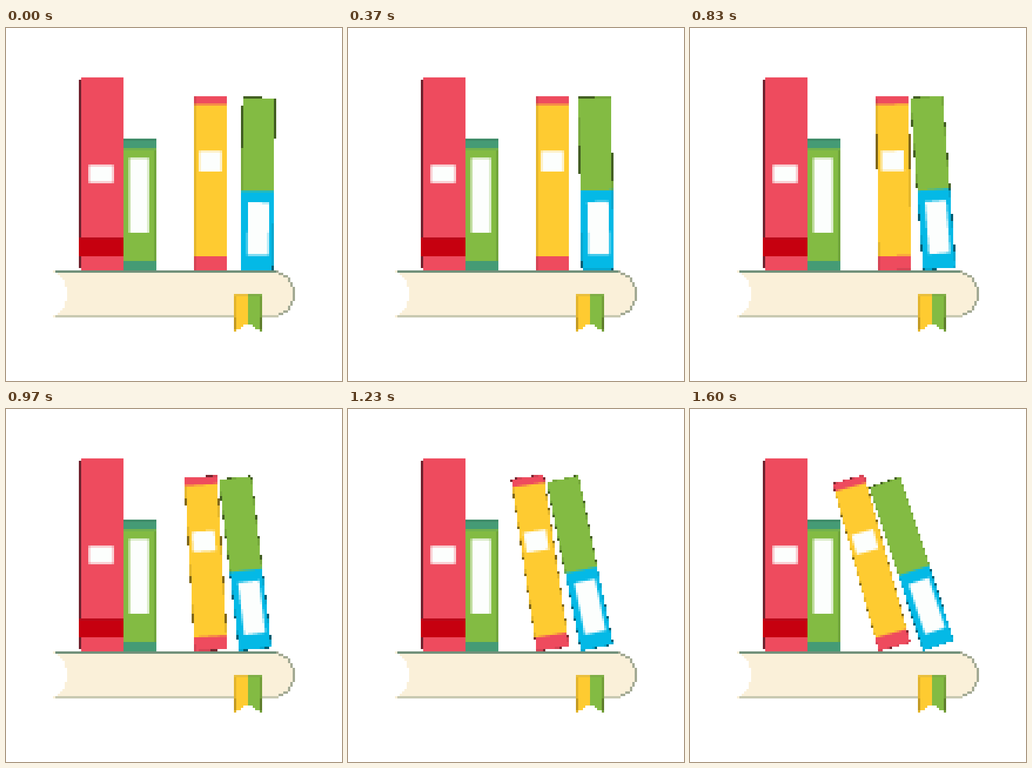
An HTML page with a canvas that plays this animation: 572 px wide and 600 px high, repeating every 2010 ms.

```html
<!DOCTYPE html>
<html lang="en">
<head>
<meta charset="utf-8">
<title>Leaning books</title>
<style>
html, body { margin: 0; width: 100%; height: 100%; overflow: hidden; background: #fff; }
canvas { display: block; width: 572px; height: 600px; image-rendering: pixelated; }
</style>
</head>
<body>
<canvas id="stage" width="143" height="150"></canvas>
<script>
const ctx = document.getElementById('stage').getContext('2d');
const CELL = 4, SUB = 4, LOOP = 2010, LAST = 48, HIT = 23.5;

const RED = [238, 75, 94], GREEN = [131, 187, 67], YELLOW = [254, 203, 49];
const CYAN = [4, 185, 230], PAPER = [252, 254, 253], CREAM = [250, 240, 217];

function cell(x, y, c) {
  ctx.fillStyle = `rgb(${c.map(Math.round)})`;
  ctx.fillRect(x / CELL, y / CELL, 1, 1);
}

function rect(x0, y0, x1, y1, color) {
  ctx.fillStyle = color;
  ctx.fillRect(x0 / CELL, y0 / CELL, (x1 - x0) / CELL, (y1 - y0) / CELL);
}

// Hard outer edge with a darkened rim, blended inner edges.
function plot(x0, y0, x1, y1, colorAt) {
  for (let y = y0; y < y1; y += CELL) {
    for (let x = x0; x < x1; x += CELL) {
      const sum = [0, 0, 0];
      let hits = 0;
      for (let i = 0; i < SUB * SUB; i++) {
        const c = colorAt(x + (i % SUB + .5) * CELL / SUB, y + (Math.floor(i / SUB) + .5) * CELL / SUB);
        if (!c) continue;
        hits++;
        c.forEach((v, n) => sum[n] += v);
      }
      const cover = hits / (SUB * SUB);
      if (cover < .5) continue;
      const shade = cover < .58 ? .5 : cover < .9 ? .9 : 1;
      cell(x, y, sum.map(v => v / hits * shade));
    }
  }
}

const within = (v, a, b) => v >= a && v < b;

// Book turned to the left about its lower left corner.
function book(px, py, w, h, deg, paint) {
  const a = deg * Math.PI / 180, s = Math.sin(a), c = Math.cos(a);
  plot(232, 104, 472, 412, (x, y) => {
    const dx = x - px, dy = py - y;
    const u = dx * c + dy * s, v = dy * c - dx * s;
    return within(u, 0, w) && within(v, 0, h) ? paint(u, v) : null;
  });
}

function yellowPaint(u, v) {
  if (within(u, 7.5, 46) && within(v, 168.5, 203)) return PAPER;
  return v < 24 || v > 282 ? RED : YELLOW;
}

function greenPaint(u, v) {
  if (within(u, 12, 48) && within(v, 26, 115.5)) return PAPER;
  return v < 135 ? CYAN : GREEN;
}

function label(x0, y0, x1, y1, back) {
  plot(Math.floor(x0 / 4) * 4, Math.floor(y0 / 4) * 4, x1, y1, (x, y) =>
    within(x, x0, x1) && within(y, y0, y1) ? PAPER : back);
}

function standing() {
  rect(124, 88, 128, 408, '#70222e');
  rect(128, 84, 200, 412, '#ee4b5e');
  rect(124, 356, 200, 388, '#c6000f');
  rect(124, 356, 200, 360, '#b80819');
  label(141, 233, 183, 263, RED);

  rect(200, 188, 256, 412, '#83bb43');
  rect(252, 204, 256, 396, '#70a53b');
  rect(200, 188, 256, 204, '#459b75');
  rect(200, 188, 256, 192, '#3f8c69');
  rect(200, 204, 256, 208, '#74b24c');
  rect(200, 396, 256, 412, '#459b75');
  label(210, 221, 243, 348, GREEN);
}

function shelf() {
  for (let y = 412; y < 492; y += CELL) {
    const d = y + 2 - 452;
    const left = Math.round((60.2 + Math.sqrt(43.8 ** 2 - d * d)) / 4) * 4;
    const right = Math.round((452 + Math.sqrt(1600 - d * d)) / 4) * 4;
    const inner = Math.round((452 + Math.sqrt(Math.max(0, 1600 - (Math.abs(d) + 4) ** 2))) / 4) * 4;
    rect(left, y, right, y + 4, '#faf0d9');
    rect(Math.min(right - 4, inner), y, right, y + 4, '#a3aa94');
  }
  rect(84, 412, 460, 416, '#71907a');
  rect(84, 488, 464, 492, '#c8c9b1');
}

function ribbon() {
  for (let x = 388; x < 436; x += CELL) {
    const off = Math.abs(x + 2 - 412);
    const end = 504 + (off > 20 ? 12 : off > 12 ? 8 : off > 8 ? 4 : 0);
    rect(x, 452, x + 4, end, x < 412 ? '#fecb31' : '#83bb43');
  }
  rect(388, 452, 392, 516, '#e3b52d');
  rect(432, 452, 436, 516, '#749f39');
  rect(388, 452, 412, 456, '#e9bf3c');
  rect(412, 452, 436, 456, '#7fae45');
  rect(388, 492, 392, 512, '#c39a23');
  rect(432, 492, 436, 512, '#5f7d2c');
}

function draw(k) {
  rect(0, 0, 572, 600, '#fff');
  standing();
  const pushed = Math.max(0, k - HIT);
  const greenTilt = -.8 + .18 * Math.min(k, HIT) + .603 * pushed;
  const foot = 398.6 - .07 * Math.min(k, 26);
  book(foot, 411.5, 55.8, 293.5, greenTilt, greenPaint);
  book(321.3, 412, 56, 296, .628 * pushed, yellowPaint);
  shelf();
  ribbon();
}

// Thirty steps a second, each start rounded to 10 ms.
function stepAt(t) {
  let k = Math.min(LAST, Math.floor(t * .03) + 1);
  while (k > 0 && Math.round(k * 10 / 3) * 10 > t) k--;
  return k;
}

let shown = -1, start = null;
function tick(now) {
  if (start === null) start = now;
  const k = stepAt((now - start) % LOOP);
  if (k !== shown) draw(shown = k);
  requestAnimationFrame(tick);
}
draw(0);
requestAnimationFrame(tick);
</script>
</body>
</html>
```
